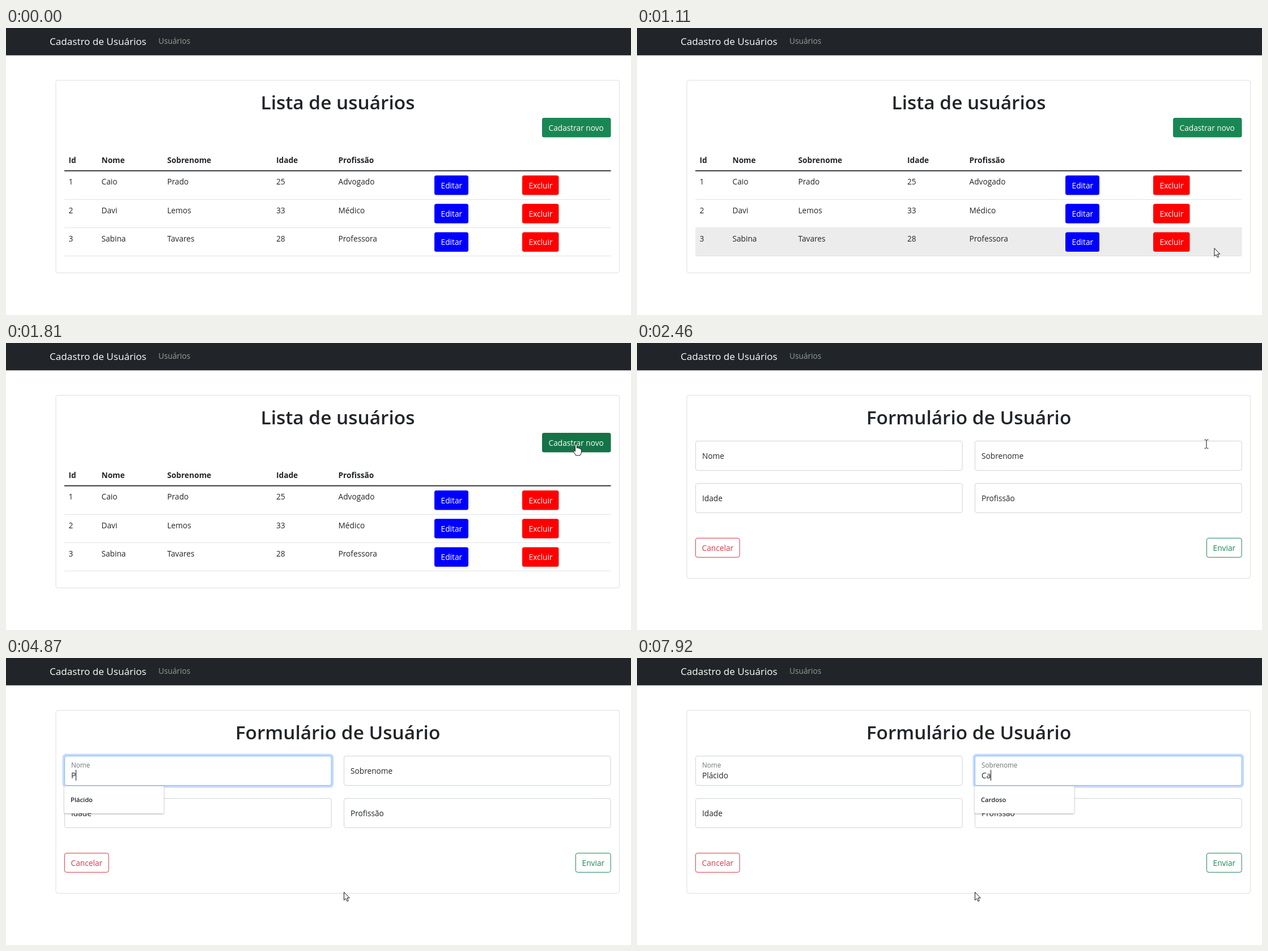
These frames come from a looping animation (1103x508 px, 8 s). An HTML page:

```html
<!DOCTYPE html>
<html lang="pt-BR">
<head>
<meta charset="utf-8">
<title>Cadastro de Usuários</title>
<style>
html, body { margin: 0; height: 100%; overflow: hidden; background: #fff; }
svg { display: block; width: 1103px; height: 508px; }
text { font: 13.7px "Open Sans", "Noto Sans", sans-serif; fill: #212529; white-space: pre; }
.white { fill: #fff; }
.bold { font-weight: 700; }
.brand { font-size: 17.1px; fill: #fff; }
.title { font-size: 33.4px; font-weight: 600; text-anchor: middle; }
.float { font-size: 11.7px; fill: #6f7275; }
.hint { font-size: 11.2px; font-weight: 600; }
.line { fill: none; stroke: #dee2e6; }
.field { fill: #fff; stroke: #ced4da; }
.focus { stroke: #86b7fe; }
.pop { fill: #fff; filter: drop-shadow(0 1px 1.5px rgba(0,0,0,.35)); }
.pointer { fill: #fff; stroke: #111; stroke-linejoin: round; }
</style>
</head>
<body>
<svg id="stage" viewBox="0 0 1103 508"></svg>
<script>
const LOOP = 8000, PRESS = 2140, OPEN_FORM = 2210, LOADED = 2290, ROW = 50.2;
const $ = id => document.getElementById(id);
const rect = (x, y, w, h, attrs = '') =>
  `<rect x="${x}" y="${y}" width="${w}" height="${h}" ${attrs}/>`;
const text = (x, y, s, cls = '', attrs = '') =>
  `<text x="${x}" y="${y}" class="${cls}" ${attrs}>${s}</text>`;
const button = (x, y, w, s, color, id = '') =>
  rect(x, y, w, 34.5, `rx="3.5" fill="${color}" ${id}`) + text(x + 11.6, y + 22.8, s, 'white');
const outline = (x, w, s, color) =>
  rect(x + .4, 345.4, w, 33.9, `rx="3.5" fill="none" stroke="${color}"`) +
  text(x + 11.6, 367.8, s, '', `style="fill:${color}"`);
const card = (h, title) => rect(88, 92.5, 994.5, h, 'rx="3.5" fill="none" stroke="#dfdfdf"') +
  text(585.5, 144, title, 'title');

const columns = [110.5, 168.5, 284.5, 477, 586.5];
const users = [
  ['1', 'Caio', 'Prado', '25', 'Advogado'],
  ['2', 'Davi', 'Lemos', '33', 'Médico'],
  ['3', 'Sabina', 'Tavares', '28', 'Professora']
];
const cells = (row, y, cls) => row.map((s, i) => text(columns[i], y, s, cls)).join('');
const rowTop = i => 253 + i * ROW;

const list = card(341, 'Lista de usuários') +
  rect(942.3, 155.3, 128.9, 41.9, 'id="ring" rx="7" fill="#9dccb6"') +
  button(946, 159, 121.5, 'Cadastrar novo', '#198754', 'id="add"') +
  cells(['Id', 'Nome', 'Sobrenome', 'Idade', 'Profissão'], 239, 'bold') +
  users.map((user, i) => {
    const y = rowTop(i);
    return rect(103, y, 964.5, 50, `id="row${i}" fill="#ececec"`) +
      `<path class="line" d="M103 ${Math.round(y + 50) + .5}H1067.5"/>` +
      cells(user, y + 24.3) +
      button(756, y + 8, 60, 'Editar', '#00f') + button(911, y + 8, 64.5, 'Excluir', '#f00');
  }).join('') + rect(103, 251.8, 964.5, 1.8, 'fill="#212529"');

const box = (x, y, attrs) => rect(x + .5, y + .5, 470.6, 52, 'rx="3.5" ' + attrs);
const plainField = (x, y, label) => box(x, y, 'class="field"') + text(x + 12, y + 32, label);
const liveField = (id, x, y, label) =>
  rect(x - 3.5, y - 3.5, 478.6, 60, `id="${id}Glow" rx="6.5" fill="#c2dbfe"`) +
  box(x, y, `id="${id}Box"`) +
  text(x + 12, y + 32, label, '', `id="${id}Label"`) +
  text(x + 12, y + 40.3, '', '', `id="${id}Value"`) +
  rect(x + 12, y + 25, 1, 19, `id="${id}Caret" fill="#111"`);
const popup = (id, x, s) => `<g id="${id}Pop">` +
  rect(x, 227, 175.5, 48, 'rx="2" class="pop"') + text(x + 11, 255, s, 'hint') + '</g>';

const form = card(324, 'Formulário de Usuário') +
  liveField('first', 103, 173, 'Nome') + liveField('last', 596, 173, 'Sobrenome') +
  plainField(103, 248, 'Idade') + plainField(596, 248, 'Profissão') +
  outline(103, 77.7, 'Cancelar', '#dc3545') + outline(1005, 61.7, 'Enviar', '#198754') +
  popup('first', 103, 'Plácido') + popup('last', 596, 'Cardoso');

$('stage').innerHTML = rect(0, 0, 1103, 48.4, 'fill="#212529"') +
  text(77, 30, 'Cadastro de Usuários', 'brand') + text(269, 28.3, 'Usuários', '', 'id="link"') +
  `<g id="list">${list}</g><g id="form">${form}</g>
  <g id="cursor">
    <path id="arrow" class="pointer" d="M.5 .5V14.7L3.7 11.7L5.9 16.7L8.2 15.7L6 10.8H10.3Z"/>
    <path id="hand" class="pointer" d="M-1.5 12V2Q-1.5 .5 0 .5T1.5 2V7.5Q4 6 4.7 8Q7 7 7.5 9
      Q9.5 8.5 9.5 11V14Q9.5 18 7 20.5H-.5Q-1.5 18-4 14.5Q-5 12-3.8 11.6Q-2.8 11.4-1.5 13.5Z"/>
    <path id="beam" fill="none" stroke="#111"
      d="M-3.5-7.5H-1L0-6.5L1-7.5H3.5M0-6.5V6.5M-3.5 7.5H-1L0 6.5L1 7.5H3.5"/>
  </g>`;

// Pointer strokes: a cubic curve from start to end, slowing down
const strokes = [
  { start: 390, end: 720, path: [[1088, 496], [1060, 480], [1015, 448], [990, 436]] },
  { start: 1060, end: 1810, path: [[992, 430], [1058, 325], [1143, 232], [1006, 178.5]] },
  { start: 2460, end: 3080, path: [[1006, 178.5], [900, 215], [450, 400], [647, 420]] },
  { start: 3770, end: 3920, path: [[647, 420], [630, 418], [613, 416], [596, 414]] }
];

const show = (id, on) => $(id).style.display = on ? '' : 'none';
const within = (v, a, b) => v >= a && v < b;

function pointerAt(t) {
  const stroke = strokes.filter(s => t >= s.start).pop();
  if (!stroke) return null;
  const rest = (1 - Math.min(1, (t - stroke.start) / (stroke.end - stroke.start))) ** 2;
  const u = 1 - rest, [a, b, c, d] = stroke.path;
  return [0, 1].map(k => rest ** 3 * a[k] + 3 * rest * rest * u * b[k] + 3 * rest * u * u * c[k] + u ** 3 * d[k]);
}

function drawPointer(t, onForm) {
  const spot = pointerAt(t), [x, y] = spot || [0, 0];
  const overAdd = !onForm && within(x, 946, 1067) && within(y, 159, 193);
  const hand = overAdd || within(t, OPEN_FORM, LOADED);
  const beam = t >= LOADED && within(x, 596, 1067) && (within(y, 173, 226) || within(y, 248, 301));
  show('cursor', spot);
  $('cursor').setAttribute('transform', `translate(${x} ${y})`);
  show('hand', hand);
  show('beam', beam);
  show('arrow', !hand && !beam);
  $('add').setAttribute('fill', overAdd ? '#157347' : '#198754');
  users.forEach((_, i) => show('row' + i, x < 1067 && within(y, rowTop(i), rowTop(i + 1))));
}

// One letter at once, a pause to read the suggestion, then a steady pace
const typed = (word, t, first, second, gap) =>
  t < first ? '' : word.slice(0, 1 + Math.max(0, Math.floor((t - second) / gap) + 1));

function drawField(id, x, value, floats, focused, caretOn) {
  const label = $(id + 'Label');
  $(id + 'Value').textContent = value;
  label.setAttribute('class', floats ? 'float' : '');
  label.setAttribute('y', floats ? 194 : 205);
  $(id + 'Box').setAttribute('class', focused ? 'field focus' : 'field');
  $(id + 'Caret').setAttribute('x', x + Math.round($(id + 'Value').getComputedTextLength()));
  show(id + 'Glow', focused);
  show(id + 'Caret', focused && caretOn);
}

function draw(now) {
  const t = now % LOOP, onForm = t >= OPEN_FORM;
  show('list', !onForm);
  show('form', onForm);
  show('ring', t >= PRESS);
  $('link').style.fill = onForm ? '#8f9f97' : '#a09c95';
  drawPointer(t, onForm);
  if (onForm) {
    const first = typed('Plácido', t, 4800, 5330, 192), last = typed('Ca', t, 7510, 7920, 192);
    drawField('first', 115, first, t >= 3540, within(t, 3540, 6730), !within(t, 4090, 4570));
    drawField('last', 608, last, t >= 6730, t >= 6730, !within(t, 7190, 7510));
    show('firstPop', within(t, 4870, 6290));
    show('lastPop', last);
  }
  requestAnimationFrame(draw);
}
draw(0);
</script>
</body>
</html>
```
